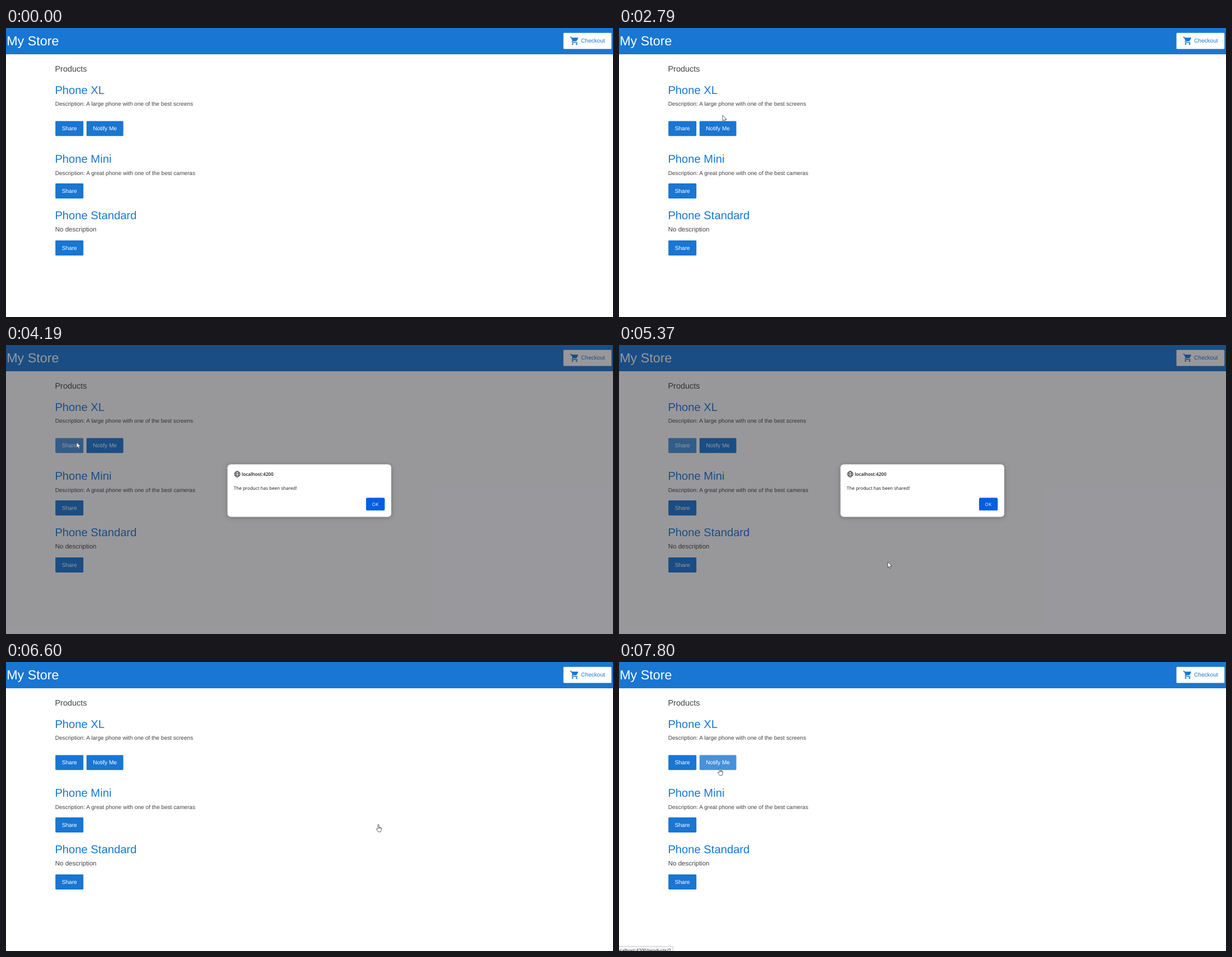
An HTML page that plays this animation: 1084 px wide and 517 px high, repeating every 8000 ms.

```html
<!DOCTYPE html>
<html lang="en">
<head>
<meta charset="utf-8">
<title>My Store</title>
<style>
  html, body { margin: 0; width: 100%; height: 100%; overflow: hidden; }
  svg {
    display: block; width: 1084px; height: 517px; background: #fff;
    font-family: Arial, "Liberation Sans", sans-serif; font-size: 10.1px;
    text-rendering: geometricPrecision;
  }
  .light { fill: #fff; }
  .ink { fill: #444; }
  .blue, .button rect { fill: #1976d2; }
  .button text { fill: #fff; text-anchor: middle; }
  .title { font-size: 20.2px; fill: #1976d2; }
  .button.hot rect, .title.hot { fill: #4791db; }
  .system { font-family: "Open Sans", "Noto Sans", sans-serif; font-size: 8.1px; fill: #15141a; }
  .globe { fill: none; stroke: #15141a; stroke-width: .9; }
  .pointer { fill: #fff; stroke: #222; stroke-width: .7; stroke-linejoin: round; }
  .hidden { display: none; }
</style>
</head>
<body>
<svg viewBox="0 0 1084 517">
  <rect class="blue" width="1084" height="47"/>
  <text class="light" x="1.2" y="31" font-size="23.3">My Store</text>
  <rect class="light" x="995.5" y="8.7" width="85.7" height="28.9" rx="1.4"/>
  <path class="blue" transform="translate(1006.8 14.3) scale(.718)" d="M7 18a2 2 0 1 0 0 4 2 2 0 0 0 0-4zM1 2v2h2l3.6 7.59-1.35 2.45C4.5 15.4 5.5 17 7 17h12v-2H7.42c-.14 0-.25-.11-.25-.25l.03-.12.9-1.63h7.45c.75 0 1.41-.41 1.75-1.03l3.58-6.49A1 1 0 0 0 20 4H5.21l-.94-2zM17 18a2 2 0 1 0 0 4 2 2 0 0 0 0-4z"/>
  <text class="blue" x="1027" y="26.3">Checkout</text>
  <text class="ink" x="87.4" y="78" font-size="14.5">Products</text>
  <g id="products"></g>

  <g id="status">
    <rect x="-2" y="508.5" width="98.5" height="12" rx="1.5" fill="#f3f3f4" stroke="#cfcfd2"/>
    <text class="system" x="93" y="518.6" text-anchor="end">localhost:4200/products/2</text>
  </g>

  <g id="dialog" class="system">
    <rect width="1084" height="517" fill="#1c1b22" fill-opacity=".45"/>
    <rect x="395.5" y="213.5" width="292.5" height="94" rx="6" fill="#fff" style="filter:drop-shadow(0 1px 4px #0004)"/>
    <g class="globe" transform="translate(413 231)">
      <circle r="5"/><ellipse rx="2.3" ry="5"/><path d="M-4.7-1.7H4.7M-4.7 1.7H4.7"/>
    </g>
    <text x="421" y="234" font-size="8.2" font-weight="600">localhost:4200</text>
    <text x="406.8" y="259.3">The product has been shared!</text>
    <rect id="ok" x="643" y="273.3" width="33.4" height="22.7" rx="2.6"/>
    <text x="659.5" y="288" text-anchor="middle" fill="#fff">OK</text>
  </g>

  <g id="cursor">
    <path id="arrow" class="pointer" d="M0 0V10.2L2.3 8 4 11.8 5.7 11 4.1 7.4H7.2Z"/>
    <path id="hand" class="pointer" transform="translate(-3.3 .3)" d="M3.4 8.8V1.3a1 1 0 0 1 2 0V5.2l3.3.7q1.2.4 1.1 1.7L9.2 11l-.8 2.6H4.2L.8 9.2q-.6-1 .2-1.4.8-.3 1.5.5zM5.4 5.2v2.3M7 5.6v2M8.5 6v1.8"/>
    <path id="beam" fill="none" stroke="#222" stroke-width=".8" d="M0 .5H2L2.5 1 3 .5H5M2.5 1V11M0 11.5H2L2.5 11 3 11.5H5"/>
    <circle id="press" cx=".8" cy=".8" r="8.8" fill="#ff0" fill-opacity=".5"/>
  </g>
</svg>
<script>
const $ = id => document.getElementById(id);

const button = (id, label, x, y, w) => `<g id="${id}" class="button">
  <rect x="${x}" y="${y}" width="${w}" height="26.8" rx="1.4"/>
  <text x="${x + w / 2}" y="${y + 16.9}">${label}</text></g>`;

const product = (id, name, y, about, aboutY, size, shareY) => `
  <text id="${id}" class="title" x="87.4" y="${y}">${name}</text>
  <text class="ink" x="87.7" y="${aboutY}" font-size="${size}">${about}</text>
  ${button(id + "Share", "Share", 88.2, shareY, 50)}`;

$("products").innerHTML =
  product("xl", "Phone XL", 118.4, "Description: A large phone with one of the best screens", 139.3, 10.1, 166.4) +
  button("notify", "Notify Me", 143.8, 166.4, 65.7) +
  product("mini", "Phone Mini", 241.2, "Description: A great phone with one of the best cameras", 262.7, 10.1, 278.1) +
  product("standard", "Phone Standard", 341.8, "No description", 364, 11.55, 380.1);

// start time, pointer x, y, shape, hovered element, extra states
const poses = [
  [0, 0, 0, ""],
  [560, 805, 474, "arrow"],
  [770, 702, 393, "arrow"],
  [1170, 500, 220, "arrow"],
  [1380, 341, 99, "arrow"],
  [1990, 305, 108, "arrow"],
  [2190, 255, 120, "arrow"],
  [2390, 220, 133, "beam"],
  [2790, 185, 156, "arrow"],
  [2990, 176, 172, "hand", "notify"],
  [3190, 157, 179, "hand", "notify"],
  [3390, 132, 177, "hand", "xlShare"],
  [3590, 126, 174, "hand", "xlShare", "press"],
  [3790, 126, 174, "arrow", "xlShare"],
  [4190, 126, 174, "arrow", "xlShare", "dialog"],
  [4580, 142, 200, "arrow", "xlShare", "dialog"],
  [4780, 215, 275, "arrow", "xlShare", "dialog"],
  [4980, 340, 350, "arrow", "xlShare", "dialog"],
  [5180, 480, 388, "arrow", "xlShare", "dialog"],
  [5380, 605, 350, "arrow", "xlShare", "dialog"],
  [5580, 667, 290, "arrow", "xlShare", "dialog"],
  [5780, 665, 289, "arrow", "xlShare", "dialog over"],
  [6000, 663, 289, "arrow", "xlShare", "dialog over"],
  [6400, 663, 289, "arrow", "xlShare", "dialog press"],
  [6600, 664, 290, "hand"],
  [7000, 560, 288, "arrow"],
  [7200, 390, 272, "arrow"],
  [7400, 255, 248, "arrow"],
  [7600, 182, 230, "hand", "mini", "status"],
  [7800, 179, 189, "hand", "notify", "status"]
];

const show = (id, on) => $(id).classList.toggle("hidden", !on);

function draw(now) {
  const t = now % 8000;
  const [, x, y, shape, hovered, extra = ""] = poses.findLast(p => p[0] <= t);
  const has = state => extra.includes(state);
  for (const id of ["dialog", "status", "press"]) show(id, has(id));
  for (const id of ["arrow", "hand", "beam"]) show(id, id === shape);
  for (const id of ["xlShare", "notify", "mini"]) $(id).classList.toggle("hot", id === hovered);
  $("ok").setAttribute("fill", has("press") ? "#053e94" : has("over") ? "#0250bb" : "#0060df");
  $("cursor").setAttribute("transform", `translate(${x} ${y})`);
}

const start = performance.now();
function frame() {
  draw(performance.now() - start);
  requestAnimationFrame(frame);
}
frame();
</script>
</body>
</html>
```
